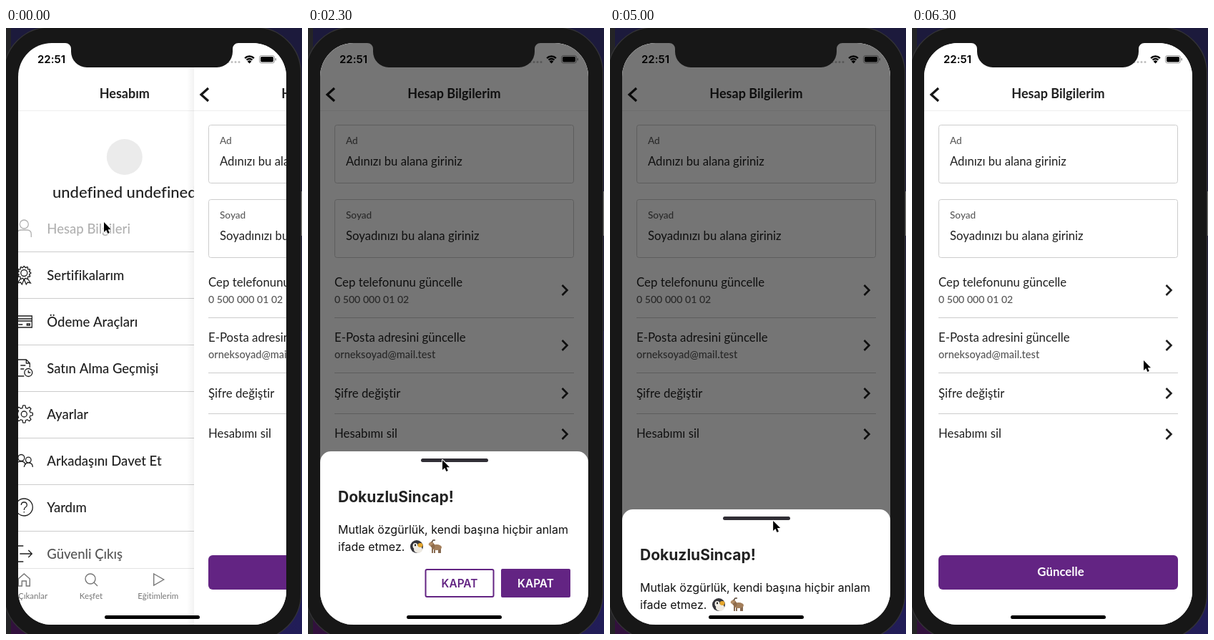
Animation of 414x846 px, one loop 6.4 s. Source, as an HTML page with a canvas:

```html
<!DOCTYPE html>
<html lang="tr">
<head>
<meta charset="utf-8">
<style>
html, body { margin: 0; width: 100%; height: 100%; overflow: hidden; background: #171717; }
canvas { display: block; width: 414px; height: 846px; }
</style>
</head>
<body>
<canvas id="stage" width="414" height="846"></canvas>
<script>
const ctx = document.getElementById('stage').getContext('2d');
const LOOP = 6400, STEP = 100, LEFT = 17, TOP = 21, WIDTH = 375, HEIGHT = 812;
const PURPLE = '#632483', INK = '#202020', BEZEL = '#171717';
const LATO = 'Lato, sans-serif', INTER = 'Inter, sans-serif';
const NOTCH = new Path2D('M83 20V21A8 8 0 0 1 91 29V33A22 22 0 0 0 113 55H295A22 22 0 0 0 317 33V29A8 8 0 0 1 325 21V20z');

// Key poses: [time, value, value...]
const POINTER = [[0, 137, 271], [1150, 137, 271], [1900, 187, 588], [2300, 188, 603], [3000, 182, 629],
  [3400, 186, 622], [3650, 207, 598], [4200, 226, 643], [4900, 228, 684], [5300, 229, 709],
  [5700, 229, 709], [6300, 324, 464], [6400, 326, 460]];
const SHEET = [[400, 850], [720, 573], [2050, 573], [2300, 591], [2600, 606], [3000, 600], [3500, 573],
  [3700, 573], [4200, 623], [4900, 668], [5300, 694], [5600, 850]];
const SHADE = [[400, 0], [720, 0.54], [5450, 0.54], [5700, 0.53], [6050, 0]];

const smooth = u => u * u * (3 - 2 * u);

function pose(keys, t) {
  if (t <= keys[0][0]) return keys[0].slice(1);
  const i = keys.findIndex(k => k[0] > t);
  if (i < 0) return keys[keys.length - 1].slice(1);
  const a = keys[i - 1], b = keys[i], u = smooth((t - a[0]) / (b[0] - a[0]));
  return a.slice(1).map((v, n) => v + (b[n + 1] - v) * u);
}

function text(str, x, y, size, weight = 400, color = INK, align = 'left', family = LATO) {
  ctx.font = `${weight} ${size}px ${family}`;
  ctx.letterSpacing = '0.01px'; // turns ligatures off
  ctx.textAlign = align;
  ctx.fillStyle = color;
  ctx.fillText(str, x, y);
}

function box(x, y, w, h, r, fill, stroke, width = 1) {
  ctx.beginPath();
  ctx.roundRect(x, y, w, h, r);
  if (fill) { ctx.fillStyle = fill; ctx.fill(); }
  if (stroke) { ctx.strokeStyle = stroke; ctx.lineWidth = width; ctx.stroke(); }
}

function line(color, width, ...points) {
  ctx.beginPath();
  points.forEach(([x, y]) => ctx.lineTo(x, y));
  ctx.strokeStyle = color;
  ctx.lineWidth = width;
  ctx.stroke();
}

function oval(x, y, rx, ry, color, angle = 0) {
  ctx.beginPath();
  ctx.ellipse(x, y, rx, ry, angle, 0, 7);
  ctx.fillStyle = color;
  ctx.fill();
}

function outline(path, x, y, color = INK, width = 1.3) {
  ctx.save();
  ctx.translate(x, y);
  ctx.strokeStyle = color;
  ctx.lineWidth = width;
  ctx.stroke(new Path2D(path));
  ctx.restore();
}

const ring = (x, y, r) => `M${x + r} ${y}a${r} ${r} 0 1 1 ${-2 * r} 0a${r} ${r} 0 1 1 ${2 * r} 0`;

function wave(cx, cy, radius, depth, count) {
  let path = '';
  for (let i = 0; i <= 96; i++) {
    const a = i / 96 * 2 * Math.PI;
    const r = radius + depth * Math.max(-1, Math.min(1, 2 * Math.cos(count * a)));
    path += `${i ? 'L' : 'M'}${cx + r * Math.cos(a)} ${cy + r * Math.sin(a)}`;
  }
  return path;
}

const MENU = [
  ['Hesap Bilgileri', ring(0, -6, 6) + 'M-10 12V8q0-6 6-6H4q6 0 6 6v4'],
  ['Sertifikalarım', wave(0, -3, 8.5, 0.9, 12) + ring(0, -3, 4.5) + 'M-5 5l-4 6 4-1 2 3 3-7 3 7 2-3 4 1-4-6'],
  ['Ödeme Araçları', 'M-11-8H11V8H-11zM-11-4H11M-11-1H11M-8 4H-2M4 3H8V5H4z'],
  ['Satın Alma Geçmişi', 'M0 11H-9V-12H3L8-7V-1M3-12V-7H8M-5-4H2M-5 1H0' + ring(6, 6, 5.5) + 'M6 3V6H9'],
  ['Ayarlar', wave(0, 0, 10.5, 1.6, 8) + ring(0, 0, 4)],
  ['Arkadaşını Davet Et', ring(-4, -4, 4.5) + ring(6, -1, 3.8) + 'M-12 9q0-8 8-8q5 0 6 5M0 9q1-6 6-6q6 0 6 6'],
  ['Yardım', ring(0, 0, 12) + 'M-4-3q0-4 4-4t4 4q0 2-2 3t-2 4M0 6v1.5'],
  ['Güvenli Çıkış', 'M-1-11H-10V11H-1M-6 0H11M6-5L11 0L6 5']
];
const TABS = [
  ['Öne Çıkanlar', 'M-8-1L0-8L8-1V9H3V2H-3V9H-8z'],
  ['Keşfet', ring(-1, -1, 7) + 'M4 4L9 9'],
  ['Eğitimlerim', 'M-6-8L8 0L-6 8z']
];

function header(title) {
  text(title, 204.5, 98, 18, 700, INK, 'center');
  line('#eeeeee', 1, [LEFT, 115.5], [LEFT + WIDTH, 115.5]);
}

function menuScreen(shift, t) {
  ctx.save();
  ctx.translate(shift, 0);
  header('Hesabım');
  oval(204.5, 180, 25, 25, '#ebebeb');
  text('undefined undefined', 204.5, 237, 22, 500, INK, 'center');
  MENU.forEach(([label, icon], i) => {
    const y = 281 + 65 * i - (i > 3 ? 1 : 0);
    ctx.globalAlpha = i ? 1 : 0.35 + 0.65 * Math.min(1, t / 300);
    outline(icon, 64, y - 1);
    text(label, 96, y + 6, 18.5, 500, i === 7 ? '#555555' : INK);
    ctx.globalAlpha = 1;
    if (i < 7) line('#cccccc', 1, [37, 312.5 + 65 * i], [372, 312.5 + 65 * i]);
  });
  ctx.fillStyle = '#fff';
  ctx.fillRect(LEFT, 754, WIDTH, 90);
  line('#e3e3e3', 1, [LEFT, 754.5], [LEFT + WIDTH, 754.5]);
  TABS.forEach(([label, icon], i) => {
    const x = 64 + 93.7 * i;
    outline(icon, x, 770, '#777777', 1.4);
    text(label, x, 797, 11.5, 400, '#777777', 'center');
  });
  ctx.restore();
}

function field(y, label, hint) {
  box(37.5, y + 0.5, 334, 81, 3, null, '#cccccc');
  text(label, 53, y + 27, 13.6, 500, '#5a5a5a');
  text(hint, 53, y + 57, 16.7);
}

function detailScreen(shift) {
  ctx.save();
  ctx.translate(shift, 0);
  if (shift > 0) {
    const shadow = ctx.createLinearGradient(LEFT - 10, 0, LEFT, 0);
    shadow.addColorStop(0, 'rgba(0,0,0,0)');
    shadow.addColorStop(1, 'rgba(0,0,0,.05)');
    ctx.fillStyle = shadow;
    ctx.fillRect(LEFT - 10, TOP, 10, HEIGHT);
  }
  ctx.fillStyle = '#fff';
  ctx.fillRect(LEFT, TOP, WIDTH, HEIGHT);
  header('Hesap Bilgilerim');
  line('#161616', 3.2, [37, 84], [27, 93], [37, 102]);
  field(135, 'Ad', 'Adınızı bu alana giriniz');
  field(239, 'Soyad', 'Soyadınızı bu alana giriniz');
  text('Cep telefonunu güncelle', 37, 361, 16.8);
  text('0 500 000 01 02', 37, 384, 14.1, 500, '#555555');
  text('E-Posta adresini güncelle', 37, 438, 16.8);
  text('orneksoyad@mail.test', 37, 461, 14.6, 500, '#555555');
  text('Şifre değiştir', 37, 515.5, 16.8);
  text('Hesabımı sil', 37, 572, 16.8);
  for (const y of [404.5, 481.5, 538.5]) line('#cccccc', 1, [37, y], [372, y]);
  for (const y of [366, 443, 510, 567]) line('#202020', 2.6, [355.5, y - 7], [362.5, y], [355.5, y + 7]);
  box(37, 736, 335, 48, 6, PURPLE);
  text('Güncelle', 208, 765, 16.8, 700, '#fff', 'center');
  ctx.restore();
}

function penguin(x, y) {
  oval(x, y, 9, 9, '#34343a');
  oval(x + 2, y + 4, 6, 5, '#eeeae2');
  oval(x - 2, y - 1, 3.5, 4, '#f2efe8');
  oval(x + 5, y - 2, 3.5, 3, '#e5a62c');
  oval(x - 2, y - 2, 1.2, 1.4, '#222222');
}

function goat(x, y) {
  for (const dx of [-4, -1, 5, 7]) line('#79593d', 1.8, [x + dx, y + 2], [x + dx, y + 9]);
  oval(x + 2, y + 1, 7, 4, '#a37e5a');
  oval(x - 4, y - 2, 3, 5, '#8f6c4b', -0.5);
  oval(x - 6, y - 4, 3.5, 2.2, '#b28d67', -0.5);
  line('#5d4a3a', 1.4, [x - 5, y - 6], [x - 3, y - 9], [x, y - 9]);
}

function sheet(y) {
  ctx.save();
  ctx.translate(0, y);
  box(LEFT, 0, WIDTH, 300, [15, 15, 0, 0], '#fff');
  box(158, 10, 94, 5, 2.5, '#302e35');
  text('DokuzluSincap!', 42, 71, 21, 700, '#222222', 'left', INTER);
  text('Mutlak özgürlük, kendi başına hiçbir anlam', 42, 114.5, 16, 400, '#111111', 'left', INTER);
  text('ifade etmez.', 42, 138.5, 16, 400, '#111111', 'left', INTER);
  penguin(152, 133);
  goat(178, 133);
  box(164.5, 165, 95, 38, 2, null, PURPLE, 2);
  box(270, 164, 97, 40, 2, PURPLE);
  text('KAPAT', 212, 190, 15.4, 600, PURPLE, 'center', INTER);
  text('KAPAT', 318.5, 190, 15.4, 600, '#fff', 'center', INTER);
  ctx.restore();
}

function desktop() {
  const glow = ctx.createLinearGradient(0, 0, 414, 0);
  ctx.fillStyle = '#1c1a3c';
  ctx.fillRect(0, 0, 414, 423);
  glow.addColorStop(0, '#32103c');
  glow.addColorStop(1, '#211d58');
  ctx.fillStyle = glow;
  ctx.fillRect(0, 423, 414, 423);
  ctx.fillStyle = '#242426';
  ctx.fillRect(0, 0, 7, 846);
  box(-3, -1, 415.5, 855, 64, BEZEL, '#343436', 1.2);
  ctx.fillStyle = '#777777';
  ctx.fillRect(413, 228, 1, 62);
}

function statusBar() {
  text('22:51', 63.5, 49, 15, 600, '#000', 'center', INTER);
  for (let i = 0; i < 4; i++) oval(311 + 5 * i, 47.5, 1.5, 1.5, 'rgba(0,0,0,.25)');
  ctx.strokeStyle = '#000';
  ctx.lineWidth = 2.3;
  for (const r of [9, 5.5]) {
    ctx.beginPath();
    ctx.arc(340.5, 48.5, r, -2.36, -0.78);
    ctx.stroke();
  }
  ctx.beginPath();
  ctx.moveTo(340.5, 49.5);
  ctx.arc(340.5, 49.5, 4, -2.36, -0.78);
  ctx.fillStyle = '#000';
  ctx.fill();
  box(354.5, 38.5, 21, 10.5, 3, null, 'rgba(0,0,0,.4)');
  box(356, 40, 18, 7.5, 1.8, '#000');
  box(376.5, 42, 1.5, 3.5, 0.7, 'rgba(0,0,0,.4)');
}

function pointer(x, y) {
  const arrow = new Path2D('M0 0V14L3.2 11L5.4 16L7.8 15L5.7 10.2H10z');
  ctx.save();
  ctx.translate(x, y);
  ctx.lineJoin = 'round';
  ctx.lineWidth = 2;
  ctx.strokeStyle = '#fff';
  ctx.stroke(arrow);
  ctx.fillStyle = '#000';
  ctx.fill(arrow);
  ctx.restore();
}

function draw(t) {
  desktop();
  ctx.save();
  ctx.beginPath();
  ctx.roundRect(LEFT, TOP, WIDTH, HEIGHT, 47);
  ctx.clip();
  ctx.fillStyle = '#fff';
  ctx.fillRect(LEFT, TOP, WIDTH, HEIGHT);
  const remaining = t < 500 ? 0.656 * Math.exp(-t / 90) : 0;
  if (remaining) menuScreen(-0.3 * WIDTH * (1 - remaining), t);
  detailScreen(Math.round(WIDTH * remaining));
  statusBar();
  ctx.fillStyle = `rgba(0,0,0,${pose(SHADE, t)[0]})`;
  ctx.fillRect(LEFT, TOP, WIDTH, HEIGHT);
  ctx.fillStyle = BEZEL;
  ctx.fill(NOTCH);
  const sheetTop = Math.round(pose(SHEET, t)[0]);
  if (sheetTop < TOP + HEIGHT) sheet(sheetTop);
  box(138, 820, 133, 5, 2.5, '#000');
  ctx.restore();
  pointer(...pose(POINTER, t));
}

const start = performance.now();
function tick() {
  const t = (performance.now() - start) % LOOP;
  draw(Math.floor(t / STEP) * STEP); // the motion advances ten times a second
  requestAnimationFrame(tick);
}
tick();
</script>
</body>
</html>
```
